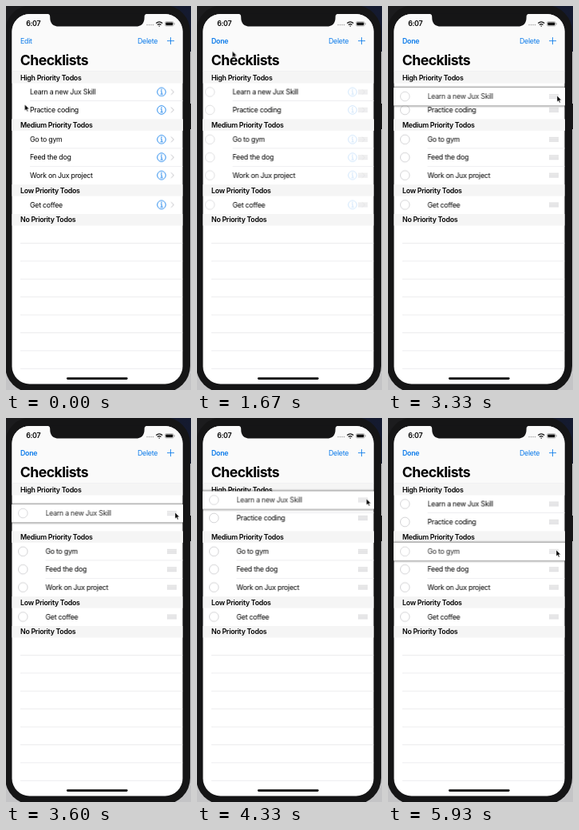
Write an HTML page that moves like this. It is 232 by 480 pixels and loops after 5990 ms.

```html
<!DOCTYPE html>
<html lang="en">
<head>
<meta charset="utf-8">
<title>Checklists</title>
<style>
html, body { margin: 0; width: 100%; height: 100%; overflow: hidden; background: #222; }
svg { display: block; width: 100vw; height: 100vh; }
text { font: 8.8px Inter, "Liberation Sans", sans-serif; letter-spacing: -.03em; fill: #000; }
.bold { font-weight: 600; }
.title { font-size: 17.6px; font-weight: 700; }
.blue { fill: #0a7aea; }
.line { stroke: #e0e0e2; stroke-width: .6; }
.info, .plus { fill: none; stroke: #0a7aea; stroke-width: .85; }
.chevron { fill: none; stroke: #c2c2c6; stroke-width: 1; }
.ring { fill: #fff; stroke: #c8c8cb; stroke-width: .8; }
.grip { stroke: #bdbdc0; stroke-width: .8; }
.plate { fill: #fff; opacity: 0; filter: drop-shadow(0 .8px 1.4px rgba(0,0,0,.9)); }

.slide, .ringbox, .grip, .detail, .edit, .done, .cursor, .learn, .practice,
.learn .plate, .gym .plate, .learn .label, .gym .label {
  animation: 5990ms linear infinite;
}
.slide { animation-name: slide; }
.ringbox { animation-name: ring; }
.grip { animation-name: appear; }
.detail { animation-name: vanish; }
.edit { animation-name: press; }
.done { animation-name: swap; }
.cursor { animation-name: cursor; }
.learn { animation-name: drag; }
.practice { animation-name: yield; }
.learn .plate { animation-name: lift1; }
.gym .plate { animation-name: lift2; }
.learn .label { animation-name: dim1; }
.gym .label { animation-name: dim2; }

@keyframes slide {
  0%, 24% { transform: translateX(0); animation-timing-function: ease-in-out; }
  30%, 100% { transform: translateX(19.5px); }
}
@keyframes ring {
  0%, 24% { transform: translateX(-20px); opacity: 0; animation-timing-function: ease-in-out; }
  30%, 100% { transform: none; opacity: 1; }
}
@keyframes appear { 0%, 24% { opacity: 0; } 30%, 100% { opacity: 1; } }
@keyframes vanish { 0%, 24% { opacity: 1; } 29%, 100% { opacity: 0; } }
@keyframes press {
  0%, 19.9% { opacity: 1; }
  21.1%, 24.4% { opacity: .17; }
  25.6%, 100% { opacity: 0; }
}
@keyframes swap { 0%, 24.4% { opacity: 0; } 27%, 100% { opacity: 1; } }
@keyframes lift1 {
  0%, 43.6% { opacity: 0; }
  47.5%, 74.6% { opacity: 1; }
  76.8%, 100% { opacity: 0; }
}
@keyframes lift2 { 0%, 93.6% { opacity: 0; } 95.6%, 100% { opacity: 1; } }
@keyframes dim1 {
  0%, 43.6% { opacity: 1; }
  47.5%, 74.6% { opacity: .86; }
  76.8%, 100% { opacity: 1; }
}
@keyframes dim2 { 0%, 93.6% { opacity: 1; } 95.6%, 100% { opacity: .86; } }
@keyframes drag {
  0%, 50.1% { transform: translateY(0); }
  55.6% { transform: translateY(5.5px); }
  60.1% { transform: translateY(11.5px); }
  64.6%, 67.95% { transform: translateY(14.5px); }
  72.29% { transform: translateY(-5px); }
  73.5% { transform: translateY(-6px); }
  76.4%, 100% { transform: translateY(0); }
}
@keyframes yield {
  0%, 58.4% { transform: translateY(0); animation-timing-function: ease-in-out; }
  62.5%, 69.5% { transform: translateY(-22.4px); }
  72.29% { transform: translateY(-5px); }
  73.8%, 100% { transform: translateY(0); }
}
@keyframes cursor {
  0%, 1.1% { transform: translate(23.5px, 123px); animation-timing-function: ease-in-out; }
  7.8%, 10.2% { transform: translate(27px, 49px); }
  16.7%, 23.5% { transform: translate(28.5px, 42px); animation-timing-function: ease-in; }
  33.4% { transform: translate(90px, 98px); animation-timing-function: ease-out; }
  40% { transform: translate(211.5px, 106px); }
  42.2%, 50.1% { transform: translate(211.5px, 107px); }
  55.6% { transform: translate(212px, 112px); }
  60.1% { transform: translate(212px, 118px); }
  64.6%, 66.8% { transform: translate(212px, 121px); }
  67.95% { transform: translate(212.5px, 118px); }
  72.29% { transform: translate(212.5px, 101px); }
  73.5% { transform: translate(212.5px, 99.5px); }
  76.8%, 77.5% { transform: translate(212px, 108px); animation-timing-function: ease-in-out; }
  86.8% { transform: translate(211px, 164px); }
  88%, 98.9% { transform: translate(211.5px, 164.5px); }
  99%, 100% { transform: translate(211px, 165px); }
}
</style>
</head>
<body>
<svg viewBox="0 0 232 480" preserveAspectRatio="none">
  <defs>
    <linearGradient id="desk">
      <stop offset=".3" stop-color="#1c1c1e"/>
      <stop offset="1" stop-color="#141a30"/>
    </linearGradient>
    <clipPath id="screen"><rect x="7.5" y="10" width="214" height="462.4" rx="22"/></clipPath>
    <g id="chev"><path class="chevron" d="M207 -3.4L210.4 0L207 3.4"/></g>
    <g id="info">
      <circle class="info" cx="195" r="5.3"/>
      <path class="info" d="M193.9 -.9H195.2V2.8M193.6 2.8H196.8"/>
      <circle class="blue" cx="195" cy="-2.7" r=".75"/>
    </g>
  </defs>
  <rect width="232" height="57" fill="url(#desk)"/>
  <rect y="57" width="232" height="423" fill="#c4c4c6"/>
  <rect x="-1" y="-1" width="232" height="484" rx="33" fill="#151516"/>
  <rect x="230" y="122" width="2" height="32" fill="#151516"/>

  <g clip-path="url(#screen)">
    <rect x="7" y="10" width="215" height="463" fill="#fff"/>
    <rect x="7" y="10" width="215" height="72" fill="#fafafa"/>
    <path class="line" d="M7 81.9H222"/>
    <g id="list"></g>

    <text class="bold" x="25.2" y="25.4">6:07</text>
    <g fill="#aaa">
      <circle cx="177" cy="23.6" r=".8"/><circle cx="179.5" cy="23.6" r=".8"/>
      <circle cx="182" cy="23.6" r=".8"/><circle cx="184.5" cy="23.6" r=".8"/>
    </g>
    <g fill="none" stroke="#111" stroke-width="1.3">
      <path d="M188.2 21.6Q192.2 18.2 196.2 21.6M189.9 23.5Q192.2 21.6 194.5 23.5"/>
      <path d="M191.6 25.2H192.8"/>
    </g>
    <rect x="199.4" y="19.5" width="10.8" height="5.6" rx="1.6" fill="none" stroke="#999" stroke-width=".6"/>
    <rect x="200.3" y="20.4" width="9" height="3.8" rx=".9" fill="#111"/>
    <path d="M211.2 21.2V23.4" stroke="#999" stroke-width=".8"/>

    <text class="blue edit" x="18" y="47">Edit</text>
    <text class="blue bold done" x="18" y="47">Done</text>
    <text class="blue" x="165" y="47">Delete</text>
    <path class="plus" d="M202 43.6H211M206.5 39.1V48.1"/>
    <text class="title" x="17.8" y="73.8">Checklists</text>
    <rect x="76" y="464.2" width="76.6" height="2.7" rx="1.35"/>
  </g>
  <path d="M51.4 9.5Q55.2 10 55.2 13.2V14Q55.2 25.6 66.4 25.6H162.4Q173.6 25.6 173.6 14V13.2Q173.6 10 177.4 9.5Z" fill="#151516"/>

  <g class="cursor">
    <path d="M0 0V7.8L1.8 6.2L3 9L4.3 8.4L3.1 5.7H5.5Z" stroke="#fff" stroke-width=".5"/>
  </g>
</svg>
<script>
const ROW = 22.4, HEAD = 14.5;
const sections = [
  ['High Priority Todos', [['Learn a new Jux Skill', 'learn'], ['Practice coding', 'practice']]],
  ['Medium Priority Todos', [['Go to gym', 'gym'], ['Feed the dog', ''], ['Work on Jux project', '']]],
  ['Low Priority Todos', [['Get coffee', '']]],
  ['No Priority Todos', []]
];

const header = (y, name) => `
  <rect x="7" y="${y}" width="215" height="${HEAD}" fill="#f5f5f5"/>
  <text class="bold" x="18" y="${y + 10.4}">${name}</text>`;

const divider = (y, x) => `<path class="line" d="M${x} ${y - .4}H222"/>`;

const row = (y, name, kind) => `
  <g transform="translate(0 ${y + ROW / 2 - .3})">
    <g class="${kind}">
      <rect class="plate" x="4" y="-11" width="222" height="${ROW}"/>
      <g class="label">
        <g class="slide"><text x="30" y="3.1">${name}</text></g>
        <g class="detail"><use href="#info"/><use href="#chev"/></g>
        <g class="ringbox"><circle class="ring" cx="21.3" r="5.8"/></g>
        <path class="grip" d="M202 -2.1H214M202 0H214M202 2.1H214"/>
      </g>
    </g>
  </g>`;

let y = 82.1, back = '', rows = '', lifted = '';
for (const [name, items] of sections) {
  back += header(y, name);
  y += HEAD;
  items.forEach(([item, kind], i) => {
    if (kind === 'learn' || kind === 'gym') lifted += row(y, item, kind);
    else rows += row(y, item, kind);
    y += ROW;
    if (i < items.length - 1) back += `<g class="slide">${divider(y, 30)}</g>`;
  });
}
for (y += ROW; y < 460; y += ROW) back += divider(y, 18);
document.getElementById('list').innerHTML = back + rows + lifted;
</script>
</body>
</html>
```
